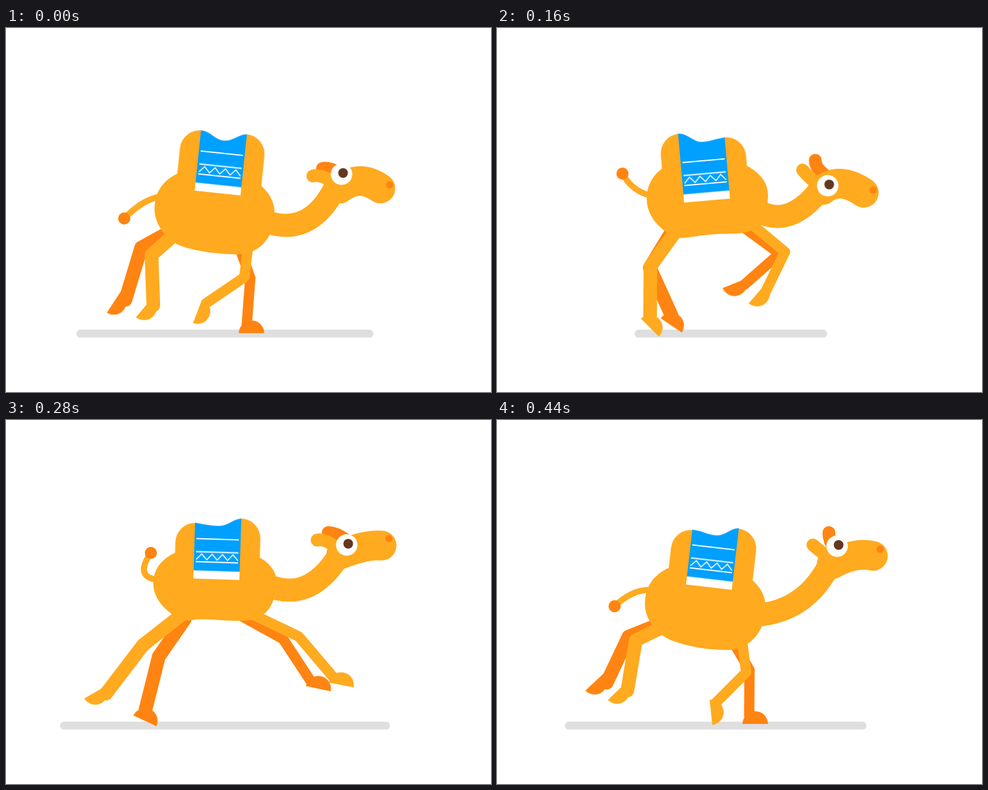
Recreate the animation shown at these times as an HTML page without scripts. Size 800 px wide and 600 px high, loop 480 ms.

```html
<!DOCTYPE html>
<html lang="en">
<head>
<meta charset="utf-8">
<title>Running camel</title>
<style>
html, body { margin: 0; width: 100%; height: 100%; overflow: hidden; background: #fff; }
svg { display: block; width: 800px; height: 600px; --near: #ffaa1f; --far: #ff8411; }

/* Poses 80 ms apart get one in-between; poses 40 ms apart are held. */
[id] { animation: .48s steps(2) infinite; }
.near { --tone: var(--near); }
.far { --tone: var(--far); }
.fill { fill: var(--tone); }
.line { fill: none; stroke: var(--tone); stroke-linecap: round; stroke-linejoin: round; }
.hind { stroke-width: 22.5px; }
.front { stroke-width: 17px; }
.ear { stroke-width: 21px; }

#shadow { animation-name: shadow; stroke: #dfdfdf; stroke-width: 13px; }
#far-hind { animation-name: far-hind; }
#far-hind-hoof { animation-name: far-hind-hoof; }
#far-front { animation-name: far-front; }
#far-front-hoof { animation-name: far-front-hoof; }
#near-hind { animation-name: near-hind; }
#near-hind-hoof { animation-name: near-hind-hoof; }
#near-front { animation-name: near-front; }
#near-front-hoof { animation-name: near-front-hoof; }
#tail { animation-name: tail; stroke-width: 10px; marker-end: url(#tuft); }
#body { animation-name: body; }
#saddle { animation-name: saddle; }
#hump { animation-name: hump; }
#cloth { animation-name: cloth; fill: #00a0ff; }
#neck { animation-name: neck; stroke-width: 38px; }
#head { animation-name: head; stroke-width: 49px; }
#far-ear { animation-name: far-ear; }
#near-ear { animation-name: near-ear; }
#eye { animation-name: eye; }
#nostril { animation-name: nostril; }

@keyframes shadow {
  0%, 100% { d: path("M122.5 503.8H599.5"); }
  16.66% { d: path("M175 503.8H570.5"); }
  33.33% { d: path("M233.5 503.8H538"); }
  50% { d: path("M165.5 503.8H581.5"); animation-timing-function: step-end; }
  58.33% { d: path("M95.5 503.8H627"); animation-timing-function: step-end; }
  66.66% { d: path("M78.5 503.8H640"); animation-timing-function: step-end; }
  75% { d: path("M82.5 503.8H634.5"); }
  91.66% { d: path("M118.5 503.8H603"); animation-timing-function: step-end; }
}
@keyframes far-hind {
  0%, 100% { d: path("M265 339L223 362L197 448"); }
  16.66% { d: path("M284 338L250 377L292 450"); }
  33.33% { d: path("M288 336L252 395L288 474"); }
  50% { d: path("M297 330L251 395L257 484"); animation-timing-function: step-end; }
  58.33% { d: path("M295 328L252 390L230 478"); }
  75% { d: path("M285 354L220 369L163 431"); }
  91.66% { d: path("M260 340L217 357L181 433"); animation-timing-function: step-end; }
}
@keyframes far-hind-hoof {
  0%, 100% { transform: translate(195px, 451px) rotate(123deg); }
  16.66% { transform: translate(295px, 448px) rotate(85deg); }
  33.33% { transform: translate(287px, 473px) rotate(34deg); }
  50% { transform: translate(254px, 483px) rotate(17deg); animation-timing-function: step-end; }
  58.33% { transform: translate(226px, 479px) rotate(25deg); }
  75% { transform: translate(162px, 434px) rotate(163deg); }
  91.66% { transform: translate(178px, 435px) rotate(137deg); animation-timing-function: step-end; }
}
@keyframes near-hind {
  0%, 100% { d: path("M275 343L240 374L243 457"); }
  16.66% { d: path("M290 343L264 386L309 452"); }
  33.33% { d: path("M295 335L253 393L252.5 475"); }
  50% { d: path("M292 325L238 381L195 469"); animation-timing-function: step-end; }
  58.33% { d: path("M290 321L226 371L165 451"); }
  75% { d: path("M272 343L216 353L160 422"); }
  91.66% { d: path("M270 343L229 363L215 446"); animation-timing-function: step-end; }
}
@keyframes near-hind-hoof {
  0%, 100% { transform: translate(245px, 462px) rotate(130deg); }
  16.66% { transform: translate(313px, 457px) rotate(93deg); }
  33.33% { transform: translate(255px, 477px) rotate(45deg); }
  50% { transform: translate(197px, 472px) rotate(83deg); animation-timing-function: step-end; }
  58.33% { transform: translate(163px, 455.5px) rotate(150deg); }
  75% { transform: translate(156px, 426.5px) rotate(163deg); }
  91.66% { transform: translate(215px, 450px) rotate(136deg); animation-timing-function: step-end; }
}
@keyframes far-front {
  0%, 100% { d: path("M388 370L403 412L397 490"); }
  16.66% { d: path("M411 344L438 393L387 436"); }
  33.33% { d: path("M410 331L466 372L408 423"); }
  50% { d: path("M400 325L467 347L461 422"); animation-timing-function: step-end; }
  58.33% { d: path("M390 324L457 361L503 431"); }
  75% { d: path("M410 359L460 387L509 449"); }
  91.66% { d: path("M392 370L416.5 412L416 488"); animation-timing-function: step-end; }
}
@keyframes far-front-hoof {
  0%, 100% { transform: translate(397px, 490px) rotate(0deg); }
  16.66% { transform: translate(379px, 441px) rotate(198deg); }
  33.33% { transform: translate(404px, 430px) rotate(158deg); }
  50% { transform: translate(465.5px, 427.5px) rotate(73deg); animation-timing-function: step-end; }
  58.33% { transform: translate(510px, 428.5px) rotate(12deg); }
  75% { transform: translate(513px, 447px) rotate(-31deg); }
  91.66% { transform: translate(418px, 488px) rotate(0deg); animation-timing-function: step-end; }
}
@keyframes near-front {
  0%, 100% { d: path("M400 355L393 411L331 453"); }
  16.66% { d: path("M423 341L450.5 391.5L408 450"); }
  33.33% { d: path("M415 319L475 369L442 437"); }
  50% { d: path("M412 320L484 348L501 422"); animation-timing-function: step-end; }
  58.33% { d: path("M410 322L483 357L540 424"); }
  75% { d: path("M400 362L432.5 423L423 489"); }
  91.66% { d: path("M404 362L411 416L362 465"); animation-timing-function: step-end; }
}
@keyframes near-front-hoof {
  0%, 100% { transform: translate(331px, 464px) rotate(111deg); }
  16.66% { transform: translate(406px, 457px) rotate(162deg); }
  33.33% { transform: translate(444px, 440.5px) rotate(131deg); }
  50% { transform: translate(507px, 427.5px) rotate(60deg); animation-timing-function: step-end; }
  58.33% { transform: translate(547.5px, 422.5px) rotate(11deg); }
  75% { transform: translate(425.5px, 489.5px) rotate(11deg); }
  91.66% { transform: translate(365px, 472.5px) rotate(84deg); animation-timing-function: step-end; }
}
@keyframes tail {
  0%, 100% { d: path("M254 278Q225 283 195 314"); }
  16.66% { d: path("M252 276Q220 277 186 294"); }
  33.33% { d: path("M252 276Q222 268 207 240"); }
  50% { d: path("M250 263Q218 240 250.5 206"); animation-timing-function: step-end; }
  58.33% { d: path("M248 263Q212 258 239 219"); }
  75% { d: path("M255 286Q220 277 186 270"); }
  91.66% { d: path("M252 280Q222 280 194 307"); animation-timing-function: step-end; }
}
@keyframes body {
  0%, 100% { d: path("M245 298C245 195 443 219 443 305C443 345 418 373 382 373S310 367 288 359S245 325 245 298Z"); }
  16.66% { d: path("M246 290C246 195 443 197 443 295C443 330 415 359 380 359S325 357 300 355S246 322 246 290Z"); }
  33.33% { d: path("M247 282C247 182 447 197 447 275C447 312 435 339 390 339S328 344 308 346S247 320 247 282Z"); }
  50% { d: path("M245 274C245 174 449 193 449 272C449 300 430 331 388 331S330 331 310 336S245 312 245 274Z"); animation-timing-function: step-end; }
  58.33% { d: path("M243 270C243 178 446 197 446 265C446 300 432 331 390 331S325 326 306 330S243 306 243 270Z"); }
  75% { d: path("M247 307C247 201 443 228 443 310C443 350 416 380 380 380S325 374 302 370S247 338 247 307Z"); }
  91.66% { d: path("M244 303C244 199 443 224 443 308C443 350 415 379 380 379S315 373 290 364S244 330 244 303Z"); animation-timing-function: step-end; }
}
@keyframes saddle {
  0%, 100% { transform: translate(349px, 272px) rotate(6deg); }
  16.66% { transform: translate(347px, 278px) rotate(1.8deg); }
  33.33% { transform: translate(346.5px, 284.5px) rotate(-5deg); }
  50% { transform: translate(346.5px, 277px) rotate(-3deg); animation-timing-function: step-end; }
  58.33% { transform: translate(347px, 262.5px) rotate(1.8deg); }
  75% { transform: translate(351.5px, 278.5px) rotate(8deg); }
  91.66% { transform: translate(349.5px, 275.5px) rotate(6.6deg); animation-timing-function: step-end; }
}
@keyframes hump {
  0%, 100% { transform: translateY(-100px); }
  16.66% { transform: translateY(-101px); }
  33.33% { transform: translateY(-114px); }
  50% { transform: translateY(-106px); animation-timing-function: step-end; }
  58.33% { transform: translateY(-92px); }
  75% { transform: translateY(-79px); }
  91.66% { transform: translateY(-90.5px); animation-timing-function: step-end; }
}
@keyframes cloth {
  0%, 100% { d: path("M-38 0V-100C-22-100-14-87 1-87S26-101 38-101V0Z"); }
  16.66% { d: path("M-38 0V-102C-22-99-14-95 1-95S26-101 38-101V0Z"); }
  33.33% { d: path("M-38 0V-114C-22-114-14-97 1-97S26-101 38-101V0Z"); }
  50% { d: path("M-38 0V-106C-22-106-14-93 1-93S26-101 38-101V0Z"); animation-timing-function: step-end; }
  58.33% { d: path("M-38 0V-92C-22-90-14-88 1-88S26-101 38-101V0Z"); }
  75% { d: path("M-38 0V-79C-22-78-14-76 1-76S20-102 38-102V0Z"); }
  91.66% { d: path("M-38 0V-91C-22-91-14-86 1-86S26-102 38-102V0Z"); animation-timing-function: step-end; }
}
@keyframes neck {
  0%, 100% { d: path("M425 318Q499 346 541 267"); }
  16.66% { d: path("M425 316Q477 363 532 298"); }
  33.33% { d: path("M420 295Q476 336 530 270"); }
  50% { d: path("M430 278Q492 310 541 244"); animation-timing-function: step-end; }
  58.33% { d: path("M430 272Q498 302 547 227"); }
  75% { d: path("M425 322Q496 303 552 225"); }
  91.66% { d: path("M425 322Q506 317 546 243"); animation-timing-function: step-end; }
}
@keyframes head {
  0%, 100% { d: path("M550 265Q583 240 617.5 264.5"); }
  16.66% { d: path("M540 297Q570 276 607.5 307"); }
  33.33% { d: path("M537 267Q565 244 605 271.5"); }
  50% { d: path("M547 238Q588 214 615 229"); animation-timing-function: step-end; }
  58.33% { d: path("M553 221Q594 205 619.5 207"); }
  75% { d: path("M557 217Q594 200 624.5 194.5"); }
  91.66% { d: path("M552 238Q590 217 620 224"); animation-timing-function: step-end; }
}
@keyframes far-ear {
  0%, 100% { d: path("M522 231.5Q535 229 550 240"); }
  16.66% { d: path("M523 253.5Q530 253 548 274"); }
  33.33% { d: path("M525 218Q525 232 545 245"); }
  50% { d: path("M529 197Q540 199 555 212"); animation-timing-function: step-end; }
  58.33% { d: path("M531.5 185.5Q545 186 560 197"); }
  75% { d: path("M543 178L560 190"); }
  91.66% { d: path("M547.5 185.5Q547 198 556 212"); animation-timing-function: step-end; }
}
@keyframes near-ear {
  0%, 100% { d: path("M506 244Q518 241 536 252"); }
  16.66% { d: path("M517.5 254Q516 270 530 284"); }
  33.33% { d: path("M504 234Q514 246 528 257"); }
  50% { d: path("M509 211.5Q520 209 536 222"); animation-timing-function: step-end; }
  58.33% { d: path("M513 198Q525 195 542 208"); }
  75% { d: path("M531 181Q534 194 548 204"); }
  91.66% { d: path("M521 206Q532 215 545 226"); animation-timing-function: step-end; }
}
@keyframes eye {
  0%, 100% { transform: translate(553.5px, 241px); }
  16.66% { transform: translate(549px, 287.7px); }
  33.33% { transform: translate(545.5px, 260px); }
  50% { transform: translate(557px, 227.5px); animation-timing-function: step-end; }
  58.33% { transform: translate(562px, 206px); }
  75% { transform: translate(567px, 189px); }
  91.66% { transform: translate(561px, 208px); animation-timing-function: step-end; }
}
@keyframes nostril {
  0%, 100% { transform: translate(633px, 258.5px); }
  16.66% { transform: translate(623.5px, 303.5px); }
  33.33% { transform: translate(620.5px, 267px); }
  50% { transform: translate(628.5px, 220px); animation-timing-function: step-end; }
  58.33% { transform: translate(631.5px, 195.5px); }
  75% { transform: translate(632px, 180.5px); }
  91.66% { transform: translate(632px, 213px); animation-timing-function: step-end; }
}
</style>
</head>
<body>
<svg viewBox="0 0 800 600">
  <defs>
    <marker id="tuft" viewBox="-10 -10 20 20" markerWidth="20" markerHeight="20" markerUnits="userSpaceOnUse">
      <circle r="10" fill="#ff8411"/>
    </marker>
  </defs>

  <path id="shadow" class="line"/>

  <g class="far">
    <path id="far-hind" class="line hind"/>
    <path id="far-hind-hoof" class="fill" d="M-11 14A21 21 0 0 1 31 14Z"/>
    <path id="far-front" class="line front"/>
    <path id="far-front-hoof" class="fill" d="M-13 13A21 21 0 0 1 29 13Z"/>
    <path id="far-ear" class="line ear"/>
  </g>

  <g class="near">
    <path id="tail" class="line"/>
    <path id="body" class="fill"/>
    <path id="near-hind" class="line hind"/>
    <path id="near-hind-hoof" class="fill" d="M-11 14A21 21 0 0 1 31 14Z"/>
    <path id="near-front" class="line front"/>
    <path id="near-front-hoof" class="fill" d="M-13 13A21 21 0 0 1 29 13Z"/>
    <path id="neck" class="line"/>
    <path id="near-ear" class="line ear"/>
    <path id="head" class="line"/>

    <g id="saddle">
      <path id="hump" class="fill" d="M-69.5 120V33A33 33 0 0 1-36.5 0H-36V120Z"/>
      <path class="fill" d="M36 10V-101.5H37.5A33 33 0 0 1 70.5-68.5V10Z"/>
      <path id="cloth"/>
      <path fill="#fff" d="M-38-13.5H38V0H-38Z"/>
      <path fill="none" stroke="#fff" stroke-width="1.8" d="M-35-66H35M-35-44.5H35M-35-28H35M-34.5-31.5l9-9.5 8.6 9.5 8.6-9.5 8.6 9.5 8.6-9.5 8.6 9.5 8.6-9.5 8.6 9.5"/>
    </g>
  </g>

  <g id="eye">
    <circle r="17.7" fill="#fff"/>
    <circle cx="2.5" cy="-2" r="8" fill="#63381f"/>
  </g>
  <circle id="nostril" class="far fill" r="6"/>
</svg>
</body>
</html>
```
